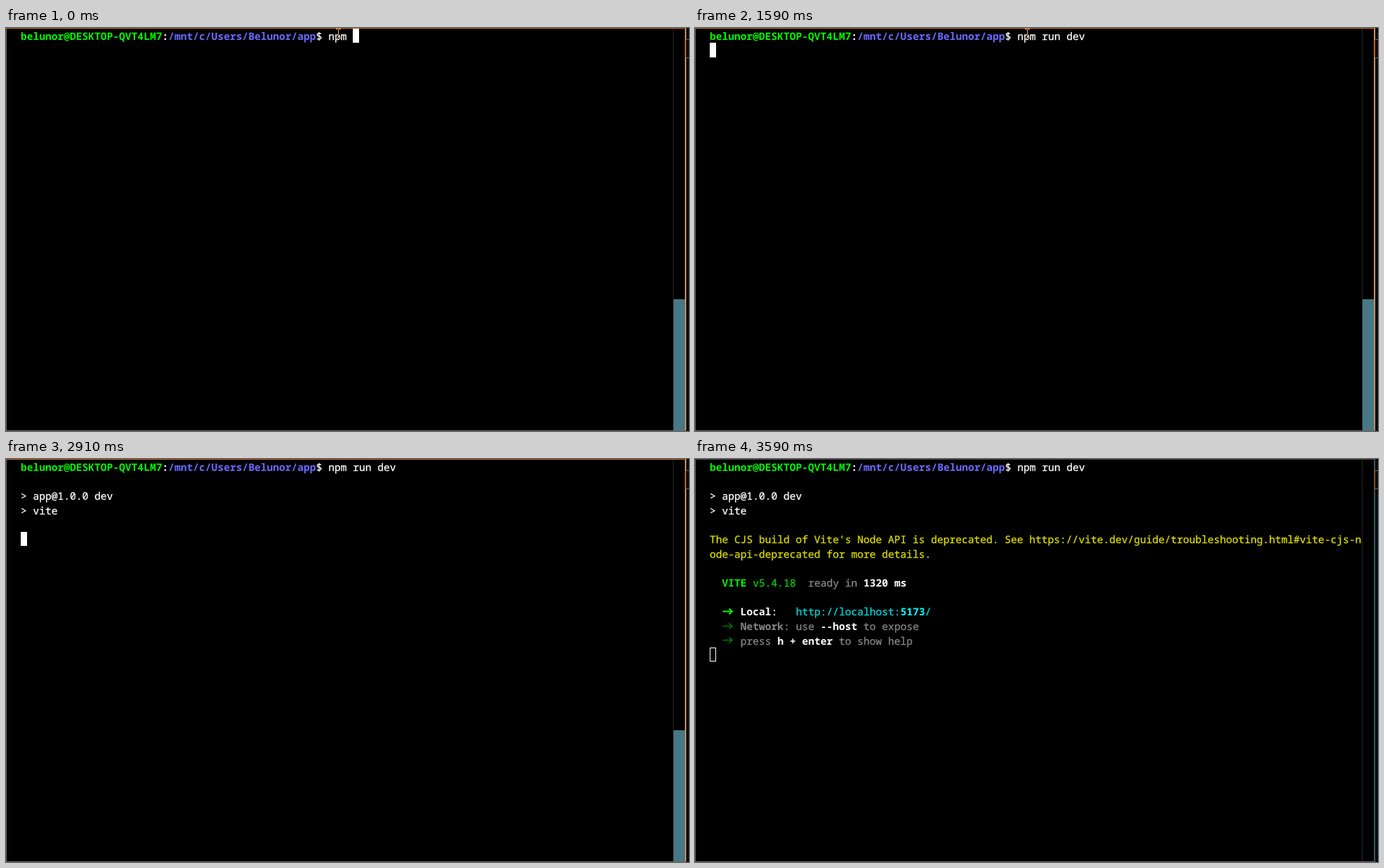
These frames come from a looping animation (973 px wide and 575 px high, 3.61 s). An HTML page:

```html
<!DOCTYPE html>
<html lang="en">
<head>
<meta charset="utf-8">
<title>Terminal</title>
<style>
  html, body { margin: 0; width: 100%; height: 100%; overflow: hidden; background: #000; }
  svg { display: block; width: 973px; height: 575px; }
  text {
    font: 500 14.607px "Noto Sans Mono", "DejaVu Sans Mono", monospace;
    text-rendering: geometricPrecision;
    font-variant-ligatures: none;
    white-space: pre;
    stroke-width: 0.3px;
  }
  .bold { font-weight: 700; stroke-width: 0; }
</style>
</head>
<body>
<svg id="stage" viewBox="0 0 973 575"></svg>
<script>
const LOOP = 3610;
const COL = 8.764, ROW = 20.64, LEFT = 21;
const WHITE = '#fff', GREEN = '#00f800', BLUE = '#6a6aff', YELLOW = '#dcdc00',
      GREY = '#868686', CYAN = '#00dade', MID_GREEN = '#00d000', DIM_GREEN = '#007c00';

const stage = document.getElementById('stage');

function add(parent, tag, attrs = {}) {
  const el = document.createElementNS('http://www.w3.org/2000/svg', tag);
  for (const key in attrs) el.setAttribute(key, attrs[key]);
  return parent.appendChild(el);
}
const rect = (x, y, width, height, fill) =>
  add(stage, 'rect', { x, y, width, height, fill });

function print(parent, col, row, str, fill, bold = false) {
  const el = add(parent, 'text', {
    x: LEFT + col * COL, y: Math.round(17 + row * ROW),
    fill, stroke: fill, class: bold ? 'bold' : ''
  });
  el.textContent = str;
  return el;
}

function arrow(parent, row, stroke, width) {
  const y = Math.round(11.5 + row * ROW) - 0.5;
  add(parent, 'path', {
    d: `M39.5 ${y}H53M48.5 ${y - 4}L53 ${y}L48.5 ${y + 4}`,
    fill: 'none', stroke, 'stroke-width': width
  });
}

// Window frame and scrollbar
rect(0, 0, 973, 575, '#000');
rect(969, 0, 4, 575, '#070c12');
rect(950, 1, 1, 573, '#262626');
const thumb = rect(951, 387, 16, 187, '#467886');
rect(0, 0, 1, 575, '#6a6a6a');
const topEdge = rect(0, 0, 968, 1);
const rightEdge = rect(967, 0, 1, 574);
const outerEdge = rect(968, 0, 1, 574);
rect(0, 574, 969, 1, '#6a6a6a');
add(stage, 'path', { d: 'M973 16.5H968.5V42.5H973', fill: 'none', stroke: '#a85a1c' });

// Prompt
print(stage, 0, 0, 'belunor@DESKTOP-QVT4LM7', GREEN, true);
print(stage, 23, 0, ':', WHITE, true);
print(stage, 24, 0, '/mnt/c/Users/Belunor/app', BLUE, true);
print(stage, 48, 0, '$', WHITE);
const command = print(stage, 50, 0, '', WHITE);

// Output, shown block by block
const script = add(stage, 'g');
print(script, 0, 2, '> app@1.0.0 dev', WHITE);
print(script, 0, 3, '> vite', WHITE);

const warning = add(stage, 'g');
print(warning, 0, 5, "The CJS build of Vite's Node API is deprecated. See " +
  'https://vite.dev/guide/troubleshooting.html#vite-cjs-n', YELLOW);
print(warning, 0, 6, 'ode-api-deprecated for more details.', YELLOW);

const ready = add(stage, 'g');
print(ready, 2, 8, 'VITE', GREEN, true);
print(ready, 7, 8, 'v5.4.18', MID_GREEN);
print(ready, 16, 8, 'ready in', GREY);
print(ready, 25, 8, '1320 ms', WHITE, true);
arrow(ready, 10, GREEN, 2);
print(ready, 5, 10, 'Local', WHITE, true);
print(ready, 10, 10, ':', WHITE);
print(ready, 14, 10, 'http://localhost:', CYAN);
print(ready, 31, 10, '5173', '#00ffff', true);
print(ready, 35, 10, '/', CYAN);
arrow(ready, 11, DIM_GREEN, 1.6);
print(ready, 5, 11, 'Network', GREY, true);
print(ready, 12, 11, ': use', GREY);
print(ready, 18, 11, '--host', WHITE, true);
print(ready, 25, 11, 'to expose', GREY);
arrow(ready, 12, DIM_GREEN, 1.6);
print(ready, 5, 12, 'press', GREY);
print(ready, 11, 12, 'h + enter', WHITE, true);
print(ready, 21, 12, 'to show help', GREY);

const cursor = add(stage, 'rect', { stroke: WHITE });
const pointer = add(stage, 'path', {
  d: 'M-3 -6.5H0M1 -6.5H4M-3 6.5H0M1 6.5H4M0.5 -6V6',
  fill: 'none', style: 'mix-blend-mode:difference'
});

// Each track is a list of [start time, value]
const typed = [[0, 'npm '], [280, 'npm r'], [410, 'npm ru'], [520, 'npm run '],
  [800, 'npm run d'], [930, 'npm run de'], [1060, 'npm run dev']];
const cursorRow = [[0, 0], [1590, 1], [1870, 5], [3070, 7], [3200, 13]];
const pointerPos = [[0, [473, 8]], [2270, [560, 70]], [2400, [830, 290]],
  [2520, [878, 374]], [2650, [885, 475]], [2770, [866, 563]], [2910, null]];
const thumbAlpha = [[0, 1], [3070, 0.69], [3200, 0.53], [3330, 0.37], [3460, 0.18], [3590, 0]];

const at = (track, t) => track.filter(([start]) => start <= t).pop()[1];
const show = (el, on) => el.setAttribute('visibility', on ? 'visible' : 'hidden');

function placeCursor(t, text, focused) {
  const row = at(cursorRow, t);
  const col = row ? 0 : 50 + text.length;
  const edgeX = c => Math.round(LEFT + c * COL);
  const edgeY = r => Math.max(1, Math.round(0.4 + r * ROW));
  cursor.setAttribute('x', edgeX(col) + 0.5);
  cursor.setAttribute('y', edgeY(row) + 0.5);
  cursor.setAttribute('width', edgeX(col + 1) - edgeX(col) - 1);
  cursor.setAttribute('height', edgeY(row + 1) - edgeY(row) - 1);
  cursor.setAttribute('fill', focused ? WHITE : 'none');
}

function render(t) {
  const text = at(typed, t);
  const focused = t < 3590;
  command.textContent = text;
  show(script, t >= 1870);
  show(warning, t >= 3070);
  show(ready, t >= 3200);
  placeCursor(t, text, focused);

  const pos = at(pointerPos, t);
  show(pointer, pos);
  if (pos) pointer.setAttribute('transform', `translate(${pos})`);
  pointer.setAttribute('stroke', t < 2270 ? '#e8c090' : '#d8d8d8');

  thumb.setAttribute('opacity', at(thumbAlpha, t));
  topEdge.setAttribute('fill', focused ? '#c4691c' : '#484848');
  rightEdge.setAttribute('fill', focused ? '#d0752a' : '#3c4448');
  outerEdge.setAttribute('fill', focused ? '#c4a884' : '#3d5c6c');
}

const begin = performance.now();
function tick() {
  render((performance.now() - begin) % LOOP);
  requestAnimationFrame(tick);
}
tick();
</script>
</body>
</html>
```
